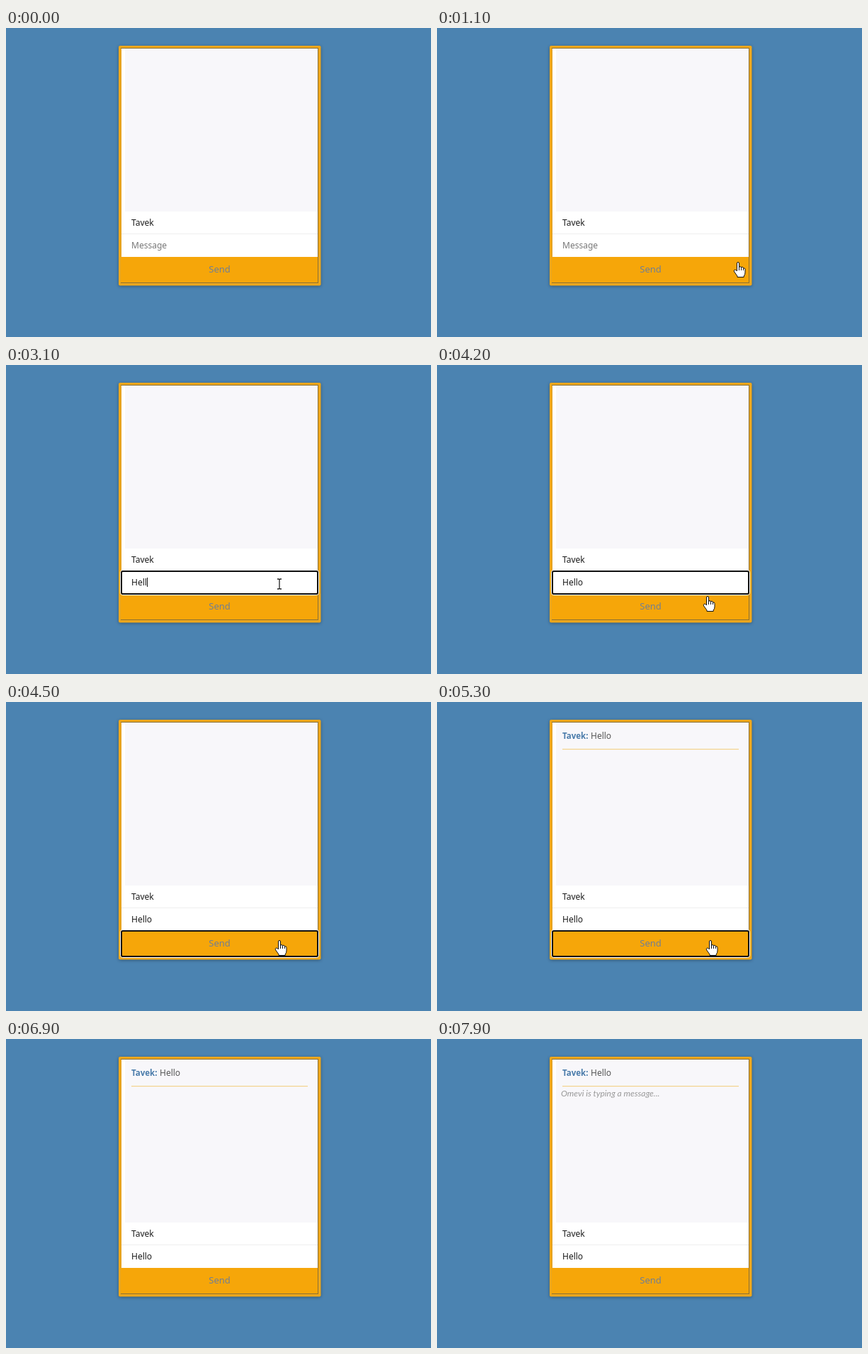
Write an HTML page that moves like this. It is 600 by 436 pixels and loops after 8000 ms.

```html
<!DOCTYPE html>
<html lang="en">
<head>
<meta charset="utf-8">
<title>Chat</title>
<style>
html, body { margin: 0; width: 100%; height: 100%; overflow: hidden; background: #4b83b1; }
svg { display: block; }
text { font: 12px "Noto Sans", "Open Sans", sans-serif; fill: #1c1c1c; }
#card { filter: drop-shadow(0 1px 2px #0005); }
.ring rect { fill: none; }
.ring .halo { stroke: #fff; stroke-width: 1; }
.ring .line { stroke: #101010; stroke-width: 2; }
#send { font-size: 13px; fill: #6f7f96; text-anchor: middle; }
#log text { fill: #575757; }
#log .who { font-size: 11.5px; font-weight: 700; fill: #4b7cab; }
#typing { font: italic 12px Lato, sans-serif; fill: #999; }
</style>
</head>
<body>
<svg width="600" height="436" viewBox="0 0 600 436">
  <rect id="card" x="159" y="25" width="285.5" height="338.5" rx="2" fill="#eda71c"/>
  <rect x="162.5" y="28.5" width="278" height="331" fill="#fff" stroke="#8d7133"/>
  <rect x="162" y="29" width="1" height="330" fill="#e5a01c"/>
  <rect x="168" y="29" width="272" height="230" fill="#f8f7fa"/>
  <rect x="163" y="290" width="277" height="1" fill="#eee"/>
  <rect x="162" y="323" width="278" height="36" fill="#f6a609"/>

  <g id="log">
    <text class="who" x="177" y="52">Tavek:</text>
    <text x="217" y="52">Hello</text>
    <rect x="177" y="66" width="249" height="1.2" fill="#f3d38c"/>
  </g>
  <text id="typing" x="175" y="81">Omevi is typing a message...</text>

  <text x="177" y="279">Tavek</text>
  <text id="message" x="177" y="311"></text>
  <rect id="caret" y="300" width="1" height="13" fill="#111"/>
  <text id="send" x="301.5" y="345">Send</text>

  <g id="inputRing" class="ring">
    <rect class="halo" x="161.5" y="289.5" width="280" height="35" rx="3"/>
    <rect class="line" x="163" y="291" width="277" height="32" rx="2"/>
  </g>
  <g id="sendRing" class="ring">
    <rect class="halo" x="161.5" y="321.5" width="280" height="39" rx="3"/>
    <rect class="line" x="163" y="323" width="277" height="36" rx="2"/>
  </g>

  <g id="pointer">
    <path id="arrow" d="M0 0V16L4 12.5 6.5 18 9 17 6.5 11.5H11.5Z" fill="#fff" stroke="#000"/>
    <path id="beam" d="M-3 -7H-1L0 -6 1 -7H3M0 -6V6M-3 7H-1L0 6 1 7H3" fill="none" stroke="#222" stroke-width="1.3"/>
    <g id="hand" fill="#fff" stroke="#111" stroke-linejoin="round">
      <path d="M-1.5 13V2Q-1.5 .5 0 .5T1.5 2V8Q1.7 6.4 3.1 6.6T4.5 8Q4.8 7 6.1 7.3T7.4 8.8Q10 8.4 10 10.5V15Q10 18 8.2 20V21.5H-1V20L-5.3 14Q-6.3 12 -4.8 11.2T-1.5 13Z"/>
      <path d="M1.5 8V12M4.5 8V12M7.4 8.8V12" fill="none"/>
    </g>
  </g>
</svg>
<script>
const LOOP = 8000, BLINK = 500, WORD = "Hello";
const FOCUS = 1600, KEYS = [2700, 2800, 2900, 3050, 3300];
const PRESS = 4400, SENT = 4600, BLUR = 6250, REPLY = 7600;
// time, x, y
const PATH = [
  [700, 443, 353], [900, 446, 342], [1400, 386, 309], [3750, 386, 309],
  [4150, 382, 326], [4300, 382, 326], [4500, 386, 336], [5300, 386, 336], [5400, 520, 338], [5480, 520, 338]
];
const $ = id => document.getElementById(id);
const show = (id, on) => $(id).setAttribute("visibility", on ? "visible" : "hidden");

function pointerAt(t) {
  const i = PATH.findIndex(p => t < p[0]);
  if (i < 1) return null;
  const [t0, x0, y0] = PATH[i - 1], [t1, x1, y1] = PATH[i];
  const u = (t - t0) / (t1 - t0), k = u * u * (3 - 2 * u);
  return [x0 + (x1 - x0) * k, y0 + (y1 - y0) * k];
}

function drawPointer(t) {
  const at = pointerAt(t);
  let shape = "";
  if (at) {
    const [x, y] = at;
    shape = x > 440 || y > 359 ? "arrow" : y > 322 ? "hand" : "beam";
    $("pointer").setAttribute("transform", `translate(${Math.round(x)} ${Math.round(y)})`);
  }
  for (const id of ["arrow", "beam", "hand"]) show(id, id === shape);
}

function draw(t) {
  const typed = KEYS.filter(k => t >= k).length;
  const message = $("message");
  message.textContent = typed ? WORD.slice(0, typed) : "Message";
  message.style.fill = typed ? "" : "#777";

  const focused = t >= FOCUS && t < PRESS;
  const since = t - (typed ? KEYS[typed - 1] : FOCUS);
  show("inputRing", focused);
  show("caret", focused && since % (2 * BLINK) < BLINK);
  $("caret").setAttribute("x", typed ? Math.round(177 + message.getComputedTextLength()) : 177);

  show("sendRing", t >= PRESS && t < BLUR);
  show("log", t >= SENT);
  show("typing", t >= REPLY);
  drawPointer(t);
}

const start = performance.now();
function tick() {
  draw((performance.now() - start) % LOOP);
  requestAnimationFrame(tick);
}
tick();
</script>
</body>
</html>
```
